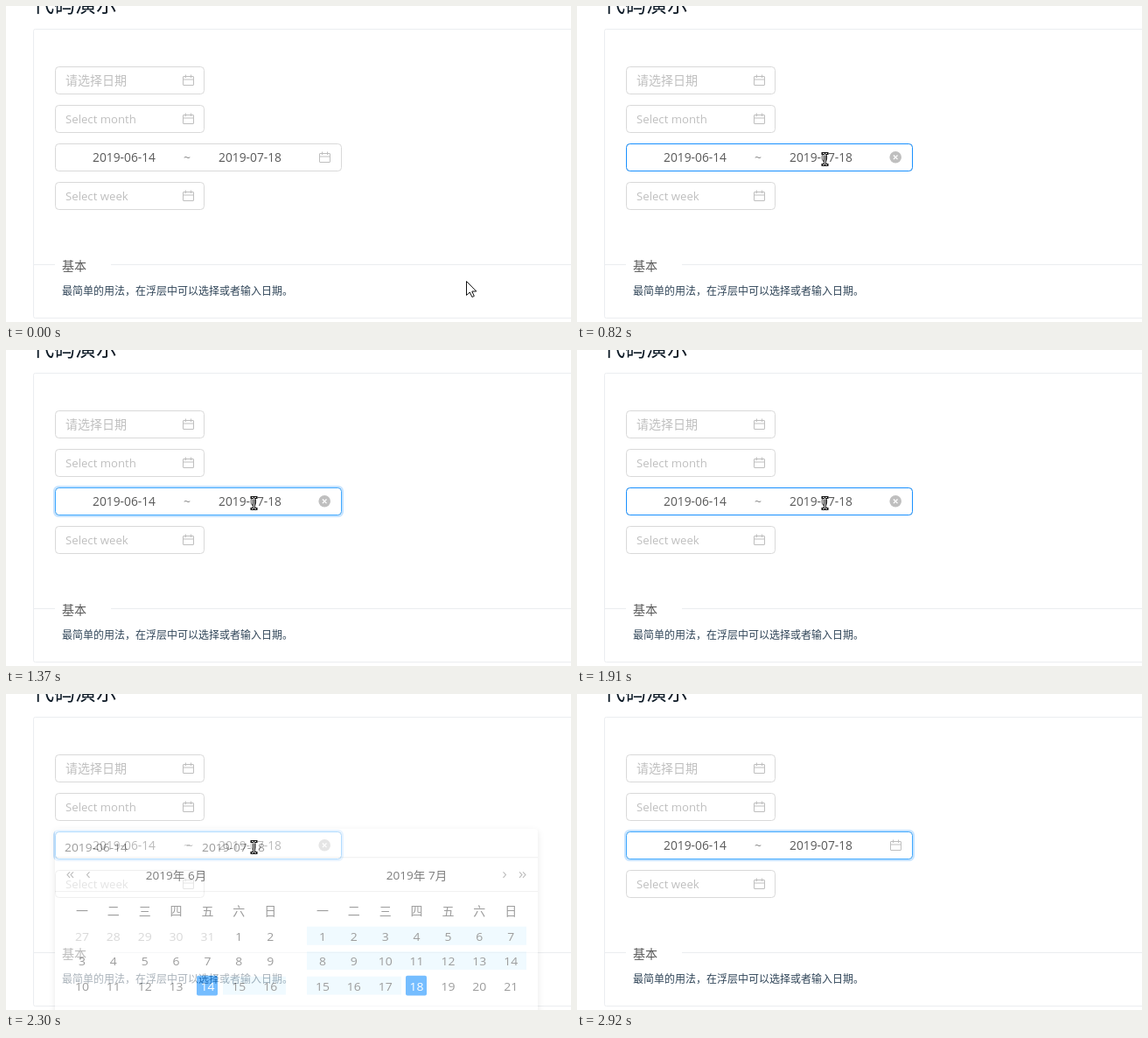
These frames come from a looping animation (646 by 361 pixels, 3550 ms). An HTML page:

```html
<!DOCTYPE html>
<html lang="zh-CN">
<head>
<meta charset="utf-8">
<title>Date range picker</title>
<style>
  html, body { margin: 0; width: 100%; height: 100%; overflow: hidden; background: #fff; }
  svg { display: block; width: 100vw; height: 100vh; }
  text { font: 14px "Open Sans", "Noto Sans CJK SC", "Noto Sans CJK", sans-serif; fill: #595959; white-space: pre; }
  .mid { text-anchor: middle; }
  .hint { font-size: 13.2px; fill: #bfbfbf; }
  .cjk { font-size: 14px; }
  .title { font-size: 24px; fill: #0d1a26; }
  .note { font-size: 12px; fill: #314659; }
  .date { font-size: 13.8px; }
  .month { font-size: 13.6px; fill: #262626; }
  .old { fill: #bfbfbf; }
  .soft { fill: #8c8c8c; }
  .picked { fill: #fff; }
  .rule { fill: none; stroke: #ebedf0; }
  .field { fill: #fff; stroke: #d9d9d9; }
  .icon { fill: none; stroke: #bfbfbf; }
  .chevron { fill: none; stroke: #8c8c8c; stroke-width: 1.1; }
  #panel { transform-origin: 56px 154px; }
  .sheet { fill: #fff; filter: drop-shadow(0 2px 4px rgba(0, 0, 0, .15)); }
</style>
</head>
<body>
<svg viewBox="0 0 646 361" preserveAspectRatio="none">
  <defs>
    <g id="cal" class="icon">
      <rect x="-6" y="-4.5" width="12" height="10" rx=".5"/>
      <path d="M-6-1H6M-3-6.5v3.5M3-6.5v3.5"/>
    </g>
    <path id="bar" d="M-2.5-6.5H-1L0-5.5 1-6.5H2.5M0-5.5V5.5M-2.5 6.5H-1L0 5.5 1 6.5H2.5"/>
  </defs>

  <text class="title" x="31" y="7">代码演示</text>
  <path class="rule" d="M646 26.5H33.5a2 2 0 0 0-2 2V354.5a2 2 0 0 0 2 2H646M32 295.5H56M120 295.5H646"/>
  <text x="64" y="302">基本</text>
  <text class="note" x="64" y="330">最简单的用法，在浮层中可以选择或者输入日期。</text>

  <g id="fields"></g>

  <rect id="ring" x="55" y="156" width="330" height="34" rx="5" fill="none" stroke="#1890ff" stroke-opacity=".25" stroke-width="2"/>
  <rect class="field" x="56.5" y="157.5" width="327" height="31" rx="4"/>
  <rect id="hoverLine" x="56.5" y="157.5" width="327" height="31" rx="4" fill="none" stroke="#1890ff"/>
  <rect id="focusLine" x="56.5" y="157.5" width="327" height="31" rx="4" fill="none" stroke="#40a9ff"/>
  <text class="date mid" x="135" y="178">2019-06-14</text>
  <text class="soft mid" x="207" y="178">~</text>
  <text class="date mid" x="279" y="178">2019-07-18</text>
  <use id="rangeIcon" href="#cal" x="364.5" y="173"/>
  <g id="clear">
    <circle cx="364.2" cy="172.8" r="6.8" fill="#bfbfbf"/>
    <path d="M361.9 170.5l4.6 4.6m0-4.6l-4.6 4.6" stroke="#fff" stroke-width="1.3"/>
  </g>

  <g id="panel">
    <rect class="sheet" x="56" y="154" width="552" height="330" rx="4"/>
    <path d="M56 188.5H608M56 229.5H608" stroke="#e8e8e8"/>
    <text class="date" x="67" y="181">2019-06-14</text>
    <text class="soft mid" x="210" y="179">~</text>
    <text class="date" x="224" y="181">2019-07-18</text>
    <text class="month mid" x="194.5" y="215">2019年 6月</text>
    <text class="month mid" x="469.5" y="215">2019年 7月</text>
    <path class="chevron" d="M73 206l-3 3.5 3 3.5M77 206l-3 3.5 3 3.5M95.500 206l-3 3.500 3 3.500M568.500 206l3 3.500-3 3.500M587 206l3 3.500-3 3.500M591 206l3 3.500-3 3.500"/>
    <path fill="#e6f7ff" d="M344 272H595v22H344zM344 302H595v22H344zM344 332H452v22H344zM248 332H320v22H248z"/>
    <rect x="218" y="331" width="24" height="24" rx="2" fill="#1890ff"/>
    <rect x="457" y="331" width="24" height="24" rx="2" fill="#1890ff"/>
    <g id="days"></g>
  </g>

  <path id="arrow" d="M.5.5V16.500L4.300 13 6.900 18.500 9.300 17.400 6.800 12H11.800Z" fill="#fff" stroke="#111"/>
  <g id="beam" fill="none">
    <use href="#bar" stroke="#111" stroke-width="3" stroke-linecap="square"/>
    <use href="#bar" stroke="#fff" stroke-width="1"/>
  </g>
</svg>
<script>
  const $ = id => document.getElementById(id);
  const LOOP = 3550;
  // The screen refreshes only at these moments.
  const TICKS = [0, 70, 140, 220, 290, 370, 440, 520, 590, 750, 820, 1050, 1130, 1220, 1300, 1370,
    1830, 1910, 2140, 2230, 2300, 2380, 2460, 2530, 2610, 2690, 2770, 2840, 2920];

  const ramp = (t, a, b) => Math.min(1, Math.max(0, (t - a) / (b - a)));
  const smooth = u => u * u * (3 - 2 * u);
  const bezier = (u, a, b, c, d) => {
    const v = 1 - u;
    return v * v * v * a + 3 * v * v * u * b + 3 * v * u * u * c + u * u * u * d;
  };

  function buildFields() {
    const rows = [[69, '请选择日期', 'cjk'], [113, 'Select month', ''], [201, 'Select week', '']];
    $('fields').innerHTML = rows.map(([y, label, kind]) =>
      `<rect class="field" x="56.5" y="${y + .5}" width="170" height="31" rx="4"/>
       <text class="hint" x="68" y="${y + 21}"${kind ? ' style="font-size:14px"' : ''}>${label}</text>
       <use href="#cal" x="208.500" y="${y + 16}"/>`).join('');
  }

  function buildDays() {
    const cell = (x, y, label, kind = '') => `<text class="mid ${kind}" x="${x}" y="${y}">${label}</text>`;
    let out = '';
    // Each month: left column centre, days carried over, chosen day.
    for (const [left, carry, chosen] of [[87, 5, 14], [362, 0, 18]]) {
      for (let i = 0; i < 28; i++) {
        const x = left + (i % 7) * 35.86, row = Math.floor(i / 7);
        if (!row) { out += cell(x, 259, '一二三四五六日'[i]); continue; }
        const day = i - 6 - carry;
        const kind = day < 1 ? 'old' : day === chosen ? 'picked' : '';
        out += cell(x, 259 + row * 30, day < 1 ? day + 31 : day, kind);
      }
    }
    $('days').innerHTML = out;
  }

  function pointer(t) {
    if (t < 590) {
      const u = smooth(t / 590);
      return [bezier(u, 526, 440, 310, 282), bezier(u, 314, 190, 45, 174)];
    }
    if (t <= 2380) return [282 + ramp(t, 700, 820), 174 + ramp(t, 590, 591)];
    const u = ramp(t, 2380, 2880) ** 1.5;
    return [283 + 332 * u, 175 + 205 * u];
  }

  // Quick opening, slow-starting closing, 200 ms each.
  const flash = (t, open, close) =>
    (1 - (1 - ramp(t, open, open + 200)) ** 5) * (1 - ramp(t, close, close + 200) ** 4);

  function draw(t) {
    const hover = ramp(t, 440, 590) * (1 - ramp(t, 2620, 2920));
    const focus = ramp(t, 1000, 1300) * (1 - ramp(t, 1750, 1910)) + ramp(t, 2000, 2300);
    const shown = t < 2000 ? flash(t, 1000, 1114) : flash(t, 2030, 2140);
    const [x, y] = pointer(t).map(Math.round);
    const typing = x < 384 && y >= 157 && y < 189;

    $('hoverLine').style.opacity = hover * (1 - focus);
    $('focusLine').style.opacity = focus;
    $('ring').style.opacity = focus;
    $('clear').style.opacity = hover;
    $('rangeIcon').style.opacity = 1 - hover;

    const panel = $('panel').style;
    panel.opacity = shown;
    panel.transform = `scaleY(${1 - .2 * (1 - shown) ** 1.5})`;

    $('arrow').style.display = typing || t >= 2920 ? 'none' : '';
    $('beam').style.display = typing ? '' : 'none';
    $('arrow').setAttribute('transform', `translate(${x} ${y})`);
    $('beam').setAttribute('transform', `translate(${x + .5} ${y})`);
  }

  buildFields();
  buildDays();
  draw(0);
  const start = performance.now();
  (function loop() {
    const t = (performance.now() - start) % LOOP;
    draw(TICKS.filter(k => k <= t).pop() || 0);
    requestAnimationFrame(loop);
  })();
</script>
</body>
</html>
```
